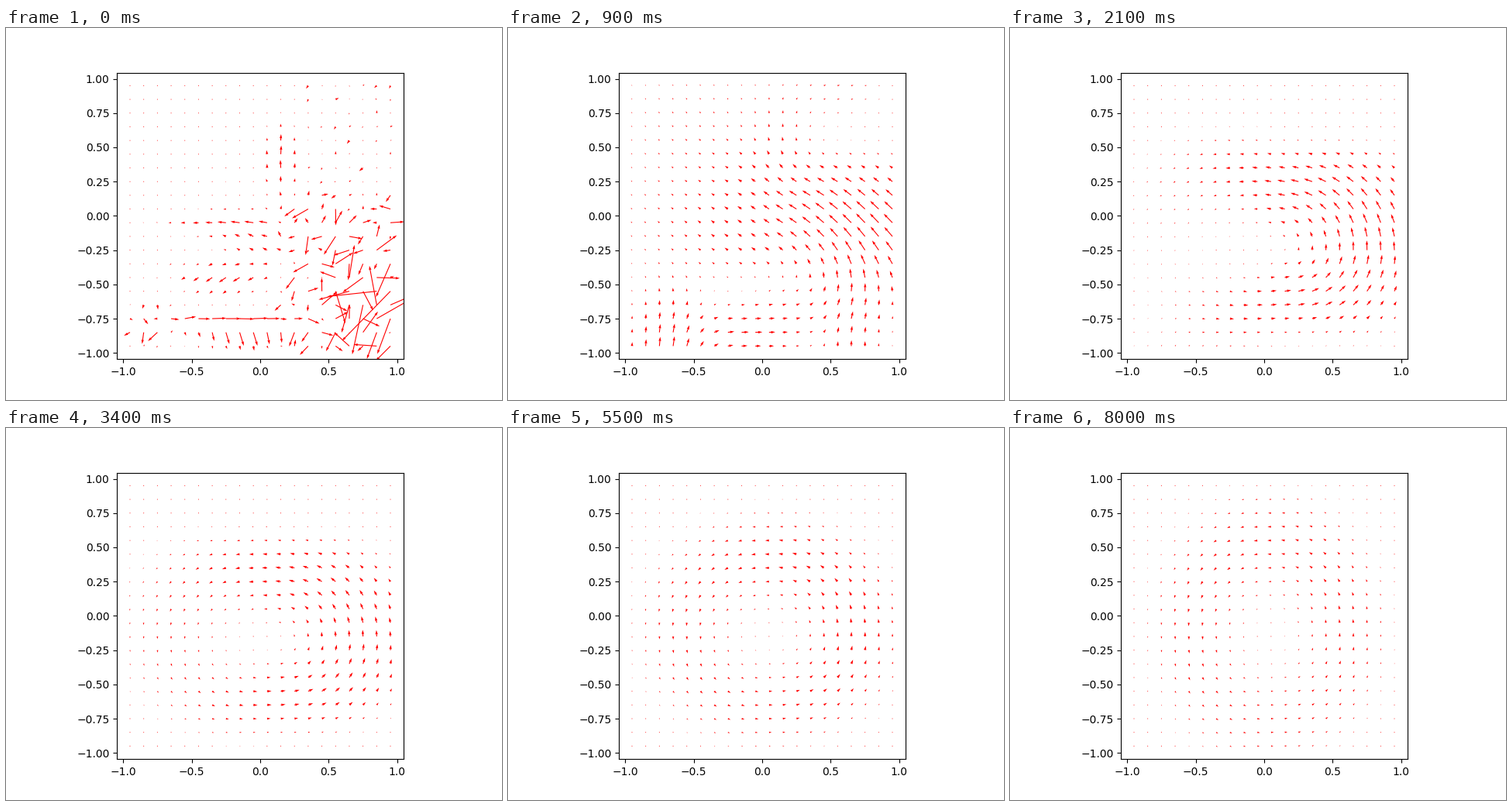
Animation of 640 by 480 pixels, one loop 8050 ms. Source, as a matplotlib script:

```python
import numpy as np
import matplotlib.pyplot as plt
from matplotlib.animation import FuncAnimation

FRAMES, STEP = 161, 50
axis = np.linspace(-0.95, 0.95, 20)
X, Y = np.meshgrid(axis, axis)


def puff(x, y, u, v, sx, sy, age=0):
    """Gaussian gust that spreads and fades with age; u, v in pixels."""
    wx, wy = np.sqrt(sx ** 2 + 0.03 * age), np.sqrt(sy ** 2 + 0.03 * age)
    gain = sx * sy / (wx * wy) * np.exp(-age / 0.9)
    shape = gain * np.exp(-((X - x) / wx) ** 2 / 2 - ((Y - y) / wy) ** 2 / 2)
    return np.array([u * shape, v * shape])


def gusts(puffs, age=0):
    return sum(puff(*p, age) for p in puffs)


def harmonics(theta, east, north, west, south):
    """Periodic function of angle through its compass values, and its slope."""
    a0 = (east + north + west + south) / 4
    a1, b1 = (east - west) / 2, (north - south) / 2
    a2 = (east + west - north - south) / 4
    value = a0 + a1 * np.cos(theta) + b1 * np.sin(theta) + a2 * np.cos(2 * theta)
    slope = -a1 * np.sin(theta) + b1 * np.cos(theta) - 2 * a2 * np.sin(2 * theta)
    return value, slope


def vortex(t):
    """Counter-clockwise ring that slows down and grows rounder."""
    q = np.clip(np.log(t / 1.3) / np.log(8 / 1.3), 0, 1)
    radii = (0.72 - 0.18 * q ** 2, 0.4 + 0.26 * q ** 2,
             0.92 - 0.35 * q, 0.4 + 0.24 * q ** 3)
    speeds = (15 * np.exp(-1.15 * q), 10 * np.exp(-0.75 * q),
              5 * q * (1.9 - q), 11 * np.exp(-1.1 * q))
    dx, dy = X - 0.12 + 0.07 * q, Y + 0.2 - 0.08 * q
    theta = np.arctan2(dy, dx)
    R, slope = harmonics(theta, *radii)
    rho = np.hypot(dx, dy) / R
    speed = harmonics(theta, *speeds)[0] * rho * np.exp((1 - rho ** 4) / 4)
    angle = theta + np.arctan2(R, slope / 2)
    return speed * np.array([np.cos(angle), np.sin(angle)])


def burst():
    """Turbulent start: thin streams, and noise that peaks at lower right."""
    rng = np.random.default_rng(7)
    streams = [(-0.2, -0.75, 19, 1, 0.4, 0.04), (-0.1, -0.87, 5, -19, 0.25, 0.05),
               (-0.2, -0.05, -10, 0, 0.3, 0.06), (-0.25, -0.45, -9, -6, 0.25, 0.08),
               (0, -0.2, -6, 4, 0.2, 0.12), (0.15, 0.4, 0, 11, 0.09, 0.18)]
    corner = 1 / (1 + np.exp(-25 * (X - 0.17))) / (1 + np.exp(25 * (Y - 0.1)))
    core = np.exp(-((X - 0.8) / 0.25) ** 2 - ((Y + 0.6) / 0.25) ** 2)
    left = np.exp(-((X + 0.8) / 0.15) ** 2 - ((Y + 0.8) / 0.15) ** 2)
    amp = 0.4 + 1.5 * (X > 0.3) + 10 * corner + 28 * core + 12 * left
    a, b = rng.normal(size=(2, *X.shape))
    return gusts(streams) + amp * np.array([a, 0.6 * a + 0.8 * b])


start = burst()
jets = [(0.95, -0.12, -17, 11, 0.95, 0.27), (0.15, 0.5, 1, 7, 0.15, 0.3),
        (-0.68, -0.98, 0, 26, 0.17, 0.27), (-0.1, -0.87, 17, 0, 0.28, 0.12),
        (0.65, -0.85, -1, 17, 0.12, 0.32), (0.55, 0.95, 6, 1, 0.25, 0.2),
        (-0.5, 0.6, -2, 4, 0.5, 0.45)]


def flow(t):
    if t < 0.5:
        fade = np.exp(-t / 0.1) * (1 - t / 0.5)
        return fade * start + (1 - fade) * (1.5 - t) * gusts(jets)
    s = min(np.log(t / 0.5) / np.log(4), 1)
    grow = s * s * (3 - 2 * s)
    return gusts(jets, t - 0.5) + grow * vortex(t)


fig, ax = plt.subplots(figsize=(6.4, 4.8), dpi=100)
ax.set_aspect("equal")
ax.set(xlim=(-1.045, 1.045), ylim=(-1.045, 1.045),
       xticks=np.arange(-1, 1.1, 0.5), yticks=np.arange(-1, 1.1, 0.25))
arrows = ax.quiver(X, Y, *start, color="red", units="width", width=0.003,
                   scale_units="dots", scale=1)


def update(i):
    arrows.set_UVC(*flow(i * STEP / 1000))
    return (arrows,)


anim = FuncAnimation(fig, update, frames=FRAMES, interval=STEP,
                     repeat=True, repeat_delay=0)
plt.show()
```
